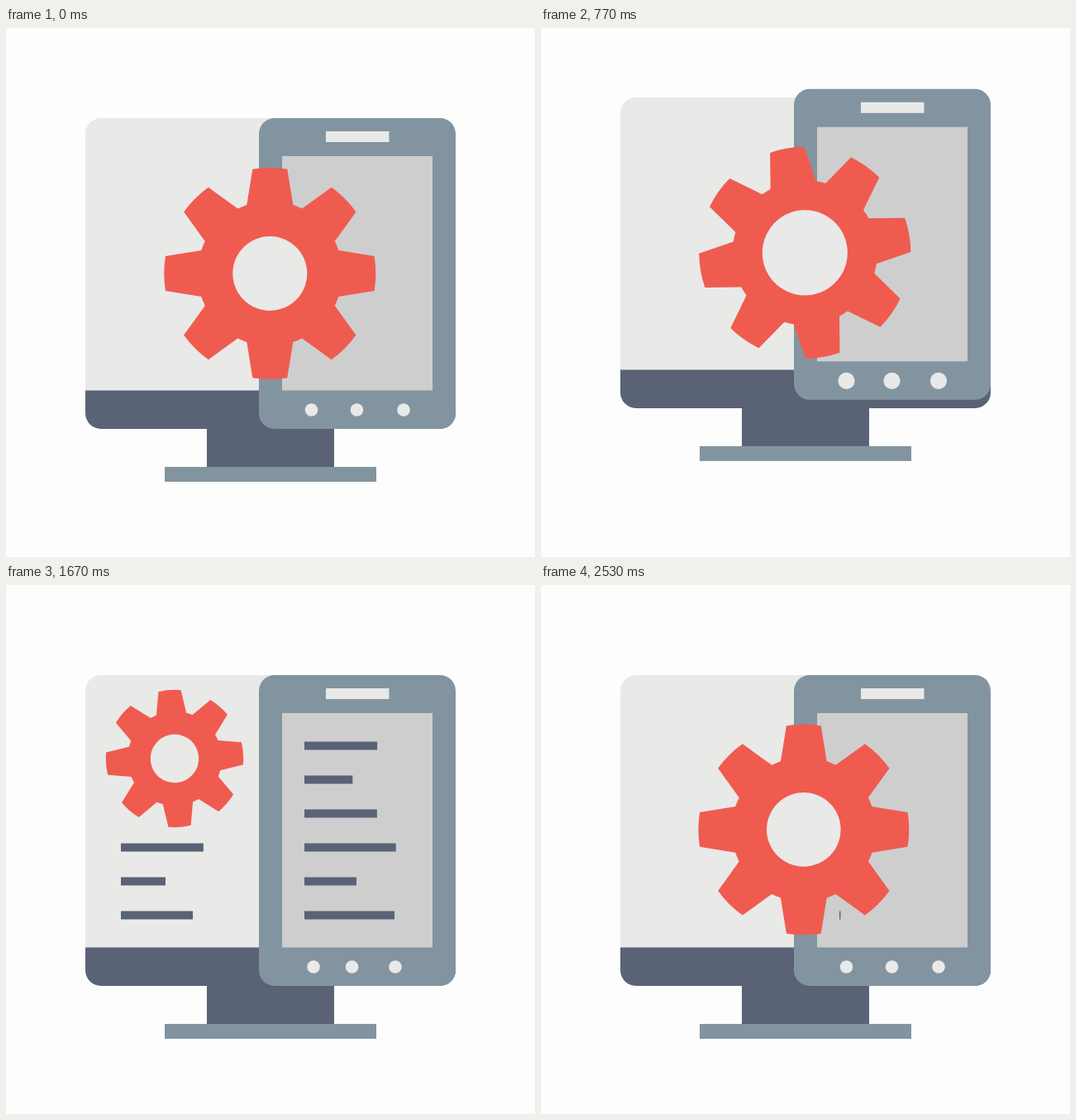
Animation of 640 by 640 pixels, one loop 2560 ms. Source, as an HTML page:

```html
<!DOCTYPE html>
<html lang="en">
<head>
<meta charset="utf-8">
<title>Devices and gear</title>
<style>
  html, body { margin: 0; width: 100%; height: 100%; overflow: hidden; background: #fdfdfd; }
  svg { display: block; width: 100vw; height: 100vh; }
  .pale { fill: #e9e9e8; }
  .dark { fill: #5a6276; }
  .gray { fill: #8394a1; }
  .glass { fill: #cecece; }
  .gear { fill: #f05b50; }
</style>
</head>
<body>
<svg viewBox="0 0 640 640">
  <g id="monitor">
    <rect class="pale" x="96" y="109" width="448" height="376" rx="19"/>
    <path class="dark" d="M96 438.5H544V466a19 19 0 0 1-19 19H397V531H243V485H115a19 19 0 0 1-19-19Z"/>
    <rect class="gray" x="192" y="531" width="256" height="18"/>
    <g id="left" class="dark"></g>
  </g>
  <g id="phone">
    <rect class="gray" x="306" y="109" width="238" height="376" rx="19"/>
    <rect class="glass" x="334" y="155" width="182" height="283.5"/>
    <rect class="pale" x="387" y="125" width="76.5" height="13"/>
    <g id="right" class="dark"></g>
    <g id="dots" class="pale"></g>
  </g>
  <g id="gear">
    <path id="teeth" class="gear"/>
    <circle id="hole" class="pale"/>
  </g>
</svg>
<script>
const LOOP = 2560, FPS = 30;
const $ = id => document.getElementById(id);

function add(parent, tag, attrs) {
  const el = document.createElementNS('http://www.w3.org/2000/svg', tag);
  for (const k in attrs) el.setAttribute(k, attrs[k]);
  return $(parent).appendChild(el);
}

// Value at tick n along [tick, value] stops, eased in and out between them.
function tween(n, ...stops) {
  if (n <= stops[0][0]) return stops[0][1];
  for (let i = 1; i < stops.length; i++) {
    const [n0, a] = stops[i - 1], [n1, b] = stops[i];
    if (n < n1) {
      const p = (n - n0) / (n1 - n0);
      return a + (b - a) * p * p * (3 - 2 * p);
    }
  }
  return stops[stops.length - 1][1];
}

function gearPath() {
  const tooth = [[-28, -83], [-21, -126.3], [21, -126.3], [28, -83]];
  const radius = [87, 0, 128, 0];
  let d = '';
  for (let i = 0; i < 8; i++) {
    const c = Math.cos(i * Math.PI / 4), s = Math.sin(i * Math.PI / 4);
    tooth.forEach(([x, y], j) => {
      const p = `${(x * c - y * s).toFixed(2)} ${(x * s + y * c).toFixed(2)}`;
      const r = radius[j];
      d += !d ? 'M' + p : r ? `A${r} ${r} 0 0 1 ${p}` : 'L' + p;
    });
  }
  return d + 'Z';
}

$('teeth').setAttribute('d', gearPath());

// Text bars: full width and stagger step
const makeBar = (parent, x, row, width, step) =>
  ({ el: add(parent, 'rect', { x, y: 189.5 + 41 * row, height: 10, width: 0 }), width, step });

const bars = [
  ...[122, 79, 109, 124, 65, 109].map((w, i) => makeBar('right', 361, i, w, i)),
  ...[[124.5, 1.95], [63.5, 2.5], [94, 3.4]].map(([w, k], i) => makeBar('left', 139, i + 3, w, k))
];
const dots = [369.5, 424.5, 481].map(x => ({ x, el: add('dots', 'circle', { cy: 462 }) }));

function draw(n) {
  const bob = tween(n, [0, 0], [10, 1], [26, -1], [36, 0]);
  const lift = tween(n, [0, 0], [12, 36.6], [24, -36.6], [36, 0]);
  const turn = tween(n, [0, 0], [10, 12], [26, -12], [41, 12], [56, -13], [76, 0]);
  const away = tween(n, [31, 0], [46, 1], [62, 1], [77, 0]);
  const y = 30.8 * bob;

  $('monitor').setAttribute('transform', `translate(0 ${y})`);
  $('phone').setAttribute('transform', `translate(0 ${lift})`);
  $('gear').setAttribute('transform',
    `translate(${319.3 - 115.3 * away} ${297 - 87 * away + y}) rotate(${turn}) scale(${1 - 0.35 * away})`);
  $('hole').setAttribute('r', 45 - 8 * bob);

  dots.forEach(({ el, x }, i) => {
    const shift = tween(n - 2.6 * i, [30, 0], [44.8, -10], [54.3, 12], [65, 0]);
    el.setAttribute('cx', x + shift);
    el.setAttribute('r', 7.8 - (bob > 0 ? 1.6 : 2.8) * bob);
  });

  for (const { el, width, step } of bars) {
    const k = 2 * step;
    el.setAttribute('width', width * tween(n, [33.2 + 0.72 * step, 0], [40 + k, 1],
      [49.5 + k, 0.72], [59 + k, 1], [68 + 1.7 * step, 0]));
  }
}

// The motion runs in steps of 1/30 s.
const start = performance.now();
function frame() {
  const t = (performance.now() - start) % LOOP;
  draw(Math.floor((t + 3.4) * FPS / 1000));
  requestAnimationFrame(frame);
}
frame();
</script>
</body>
</html>
```
